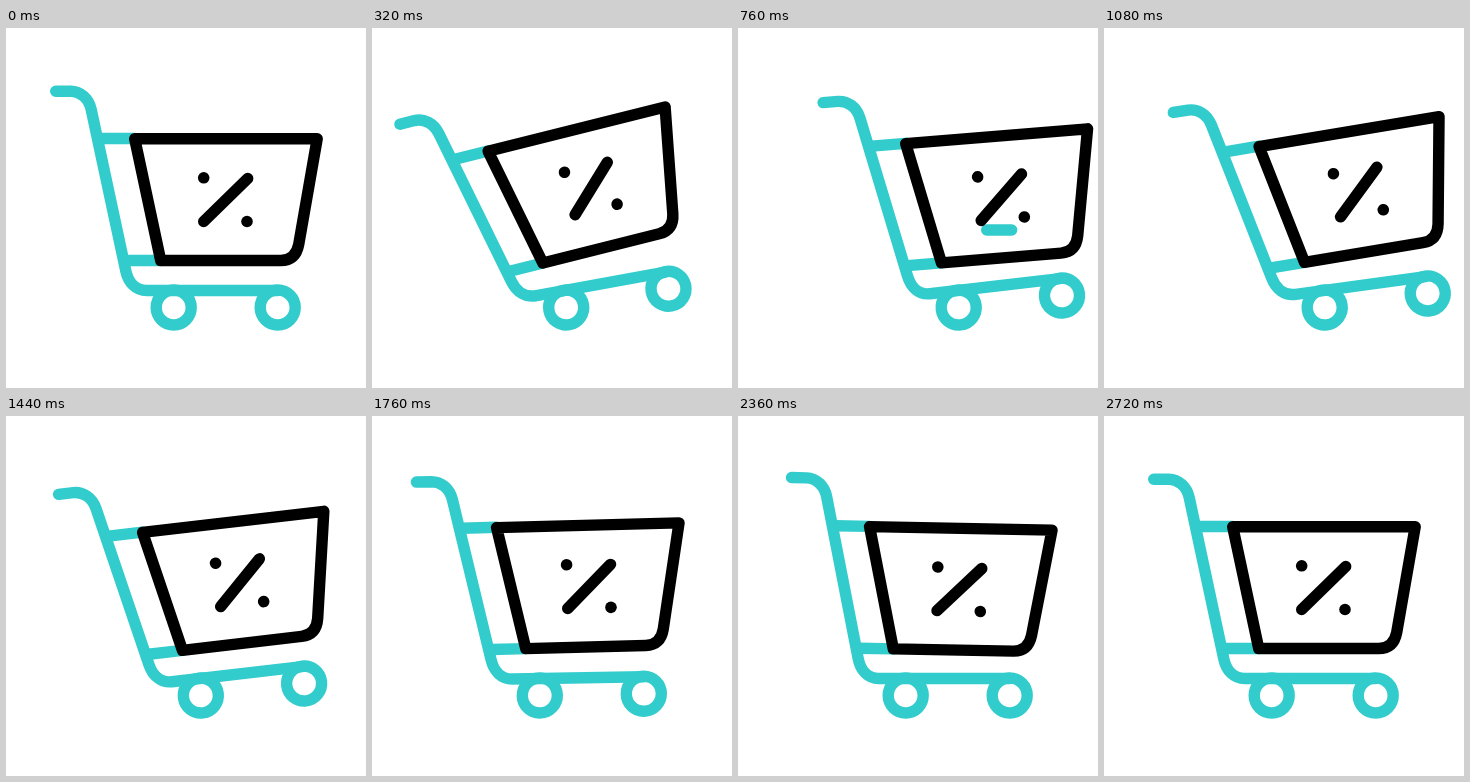
Animation of 360x360 px, one loop 2840 ms. Source, as an HTML page:

```html
<!DOCTYPE html>
<html lang="en">
<head>
<meta charset="utf-8">
<title>Rolling cart</title>
<style>
html, body { margin: 0; width: 100%; height: 100%; overflow: hidden; background: #fff; }
svg { display: block; width: 100vw; height: 100vh; }
.line { fill: none; stroke-width: 11.4; stroke-linecap: round; stroke-linejoin: round; }
.teal { stroke: #33cccc; }
.black { stroke: #000; }
</style>
</head>
<body>
<svg viewBox="0 0 360 360">
  <g transform="translate(0.7 0.5)">
    <path id="arms" class="line teal" d="M94 110H128M120 232H154"/>
    <path id="frame" class="line teal"/>
    <g id="wheels" class="line teal">
      <circle cx="167" cy="279" r="17.5"/>
      <circle cx="271" cy="279" r="17.5"/>
    </g>
    <path id="dash" class="line teal"/>
    <g id="basket" class="line black">
      <path d="M128 110.3H310.5L292 216Q289 232 274 232H154Z"/>
      <path d="M197 193L241 150"/>
      <g fill="#000" stroke="none">
        <circle cx="197" cy="149.3" r="5.8"/>
        <circle cx="240.3" cy="193" r="5.8"/>
      </g>
    </g>
  </g>
</svg>
<script>
const LOOP = 2840, STEP = 40;
const AXLE = [167, 279], HINGE = [137, 262];
const el = id => document.getElementById(id);
const span = (t, a, b) => Math.min(1, Math.max(0, (t - a) / (b - a)));
const ease = (t, a, b) => (1 - Math.cos(Math.PI * span(t, a, b))) / 2;
const bump = (t, a, b) => Math.sin(Math.PI * span(t, a, b)) ** 2;

const travel = t => 53 * (ease(t, 0, 640) - ease(t, 1110, 1780));

// Tilt of the chassis: a held wheelie with a kick at each change of speed
const tilt = t => -6.65 * (ease(t, 0, 360) - ease(t, 1460, 1860))
  - 4.1 * bump(t, 40, 680) - 1.4 * bump(t, 880, 1440);

// Extra sway of the basket and handle, ending in a forward nod
const sway = t => -3.8 * bump(t, 40, 680) + 2 * bump(t, 600, 920)
  - 2 * bump(t, 880, 1440) - 1.5 * bump(t, 1440, 1840)
  + 2.7 * (ease(t, 1800, 2000) - ease(t, 2000, 2640));

function rotate([x, y], [cx, cy], deg) {
  const a = deg * Math.PI / 180, c = Math.cos(a), s = Math.sin(a);
  return [cx + (x - cx) * c - (y - cy) * s, cy + (x - cx) * s + (y - cy) * c];
}

function draw(t) {
  const shift = travel(t), base = tilt(t), flex = sway(t);

  const onBase = (x, y) => {
    const p = rotate([x, y], AXLE, base);
    return (p[0] + shift).toFixed(2) + " " + p[1].toFixed(2);
  };
  const onBody = (x, y) => onBase(...rotate([x, y], HINGE, flex));

  // The lower bend joins the swaying pole to the chassis
  el("frame").setAttribute("d",
    `M${onBody(49, 62.7)}L${onBody(64, 62.7)}` +
    `C${onBody(74, 63)} ${onBody(82, 70)} ${onBody(84.5, 81)}` +
    `L${onBody(119, 242)}` +
    `C${onBody(121.5, 254)} ${onBase(129, 262)} ${onBase(140, 262)}` +
    `L${onBase(271, 262)}`);

  const roll = `translate(${shift} 0) rotate(${base} ${AXLE})`;
  const lean = `${roll} rotate(${flex} ${HINGE})`;
  el("wheels").setAttribute("transform", roll);
  el("arms").setAttribute("transform", lean);
  el("basket").setAttribute("transform", lean);

  const head = 273 - 25 * span(t, 680, 760), tail = 273 - 25 * span(t, 760, 840);
  el("dash").setAttribute("d", head < tail ? `M${head} 201.5H${tail}` : "");
}

const start = performance.now();
function tick() {
  const t = (performance.now() - start) % LOOP;
  draw(t < 2 * STEP ? 0 : Math.floor(t / STEP) * STEP);
  requestAnimationFrame(tick);
}
tick();
</script>
</body>
</html>
```
